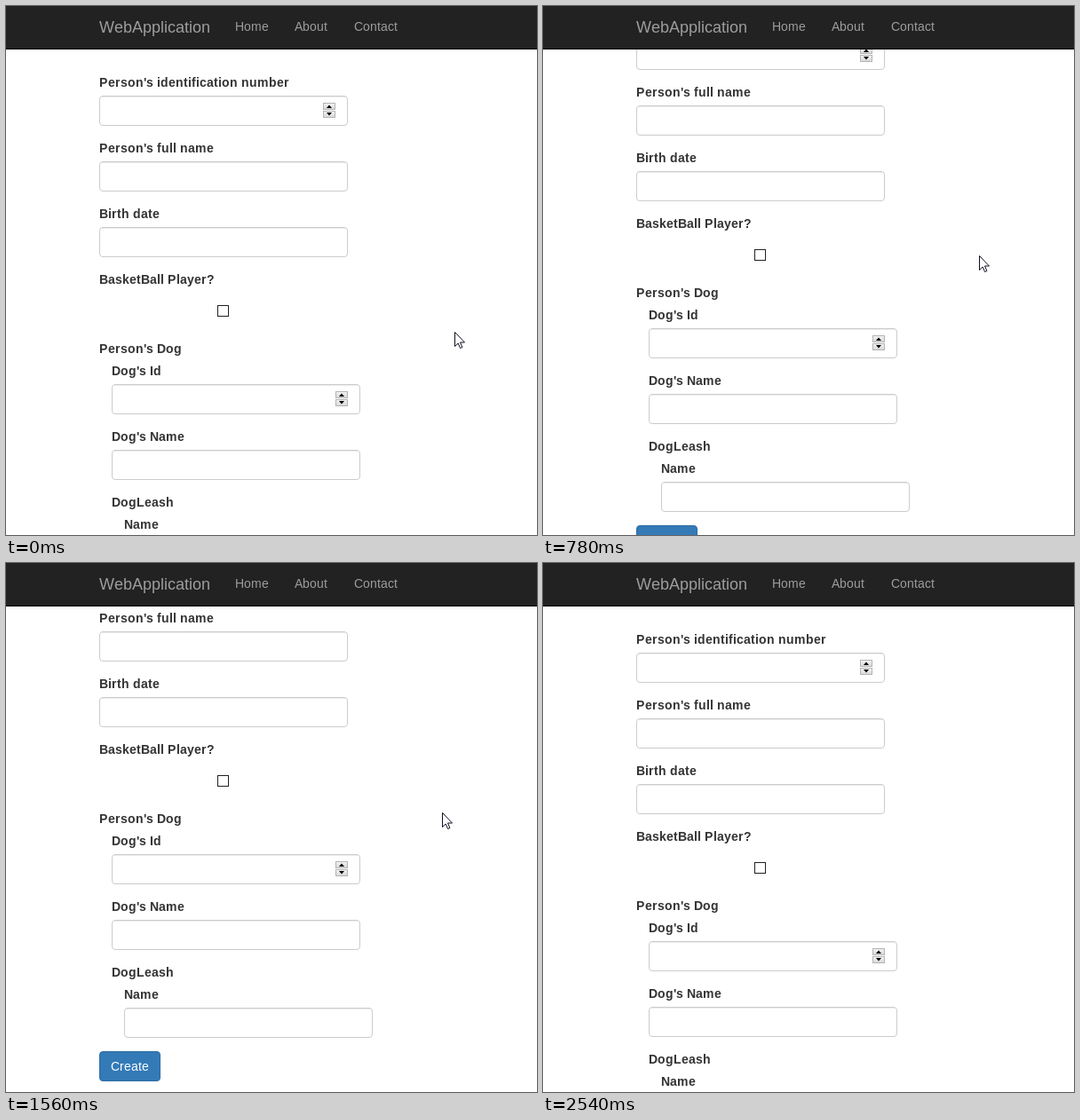
These frames come from a looping animation (598x596 px, 3.02 s). An HTML page:

```html
<!DOCTYPE html>
<html lang="en">
<head>
<meta charset="utf-8">
<title>Create person form</title>
<style>
html, body { margin: 0; width: 100%; height: 100%; overflow: hidden; background: #fff; }
svg { display: block; width: 598px; height: 596px; }
text { font-family: "Liberation Sans", Arial, sans-serif; font-size: 14px; fill: #333; white-space: pre; }
</style>
</head>
<body>
<svg id="stage" viewBox="0 0 598 596">
  <defs>
    <linearGradient id="face" x2="0" y2="1">
      <stop offset="0" stop-color="#f4f4f4"/>
      <stop offset="1" stop-color="#d8d8d8"/>
    </linearGradient>
  </defs>
  <rect width="598" height="596" fill="#fff"/>
  <g id="page"></g>
  <g id="nav">
    <rect width="598" height="48" fill="#222"/>
    <rect y="48" width="598" height="1" fill="#080808"/>
  </g>
  <path id="cursor" d="M.5 .5V16.5L4.2 13L6.6 18.5L8.9 17.5L6.5 12H11.5Z"
    fill="#fff" stroke="#101020" stroke-linejoin="round"/>
</svg>
<script>
const NS = "http://www.w3.org/2000/svg";
const page = document.getElementById("page");
const nav = document.getElementById("nav");
const cursor = document.getElementById("cursor");
const pen = document.createElement("canvas").getContext("2d");

function add(parent, tag, attrs) {
  const el = document.createElementNS(NS, tag);
  for (const key in attrs) el.setAttribute(key, attrs[key]);
  return parent.appendChild(el);
}

// Places glyphs on whole pixels, like hinted screen text.
function write(parent, str, x, y, { size = 14, bold = false, fill = "#333" } = {}) {
  const weight = bold ? "bold" : "normal";
  pen.font = `${weight} 1000px "Liberation Sans", Arial, sans-serif`;
  const bias = bold ? 0.165 : 0;
  const xs = [];
  for (const ch of str) {
    xs.push(x);
    x += Math.round(pen.measureText(ch).width * size / 1000 + bias);
  }
  add(parent, "text", {
    x: xs.join(" "), y, style: `font-size:${size}px;font-weight:${weight};fill:${fill}`
  }).textContent = str;
}

const label = (str, x, y) => write(page, str, x, y, { bold: true });

function spinner(x, y) {
  for (const dy of [0, 9])
    add(page, "rect", { x: x + .5, y: y + dy + .5, width: 13, height: 7, fill: "url(#face)", stroke: "#b4b4b4" });
  add(page, "path", { d: `M${x + 4} ${y + 6}h6l-3 -3.5zM${x + 4} ${y + 11}h6l-3 3.5z`, fill: "#000" });
}

function field(str, x, y, numeric) {
  label(str, x, y);
  const top = y + 10;
  add(page, "rect", { x: x + .5, y: top + .5, width: 279, height: 33, rx: 3.5, fill: "#fff", stroke: "#ccc" });
  add(page, "path", { d: `M${x + 3} ${top + 1.5}h274`, stroke: "#000", "stroke-opacity": .075 });
  if (numeric) spinner(x + 252, top + 8);
}

field("Person's identification number", 105, 91, true);
field("Person's full name", 105, 165);
field("Birth date", 105, 239);
label("BasketBall Player?", 105, 313);
add(page, "rect", { x: 238.5, y: 337.5, width: 12, height: 12, fill: "#fff", stroke: "#222" });
label("Person's Dog", 105, 391);
field("Dog's Id", 119, 416, true);
field("Dog's Name", 119, 490);
label("DogLeash", 119, 564);
field("Name", 133, 589);
add(page, "rect", { x: 105.5, y: 648.5, width: 68, height: 33, rx: 3.5, fill: "#337ab7", stroke: "#2e6da4" });
write(page, "Create", 118, 670, { fill: "#fff" });
add(page, "rect", { x: 105, y: 717, width: 493, height: 1, fill: "#eee" });
write(page, "© 2016 - WebApplication", 105, 753);

const grey = "#9d9d9d";
write(nav, "WebApplication", 105, 30, { size: 18, fill: grey });
write(nav, "Home", 258, 28, { fill: grey });
write(nav, "About", 325, 28, { fill: grey });
write(nav, "Contact", 392, 28, { fill: grey });

const LOOP = 3020;
const HIDE = 2540;
const ticks = [0, 70, 130, 200, 260, 320, 470, 530, 600, 620, 720, 830, 930,
  1010, 1090, 1160, 1240, 1470, 1560, 1620, 1700, 1790,
  1940, 2010, 2090, 2170, 2240, 2320, 2400, 2480, HIDE];
const scrollKeys = [[0, 0], [440, 0], [600, 27], [930, 127], [950, 127], [1240, 156],
  [1430, 156], [1560, 98], [1790, 0]];
const cursorKeys = [[0, 505, 367], [20, 505, 367], [320, 492, 281], [470, 492, 281],
  [530, 491, 281], [1700, 491, 281], [1790, 491, 286], [1870, 491, 286],
  [1940, 490, 308], [2400, 521, 539], [2480, 538, 580]];

function sample(keys, t) {
  const next = keys.findIndex(k => k[0] > t);
  if (next < 0) return keys[keys.length - 1].slice(1);
  const a = keys[next - 1], b = keys[next];
  const p = (t - a[0]) / (b[0] - a[0]);
  return a.slice(1).map((v, i) => Math.round(v + (b[i + 1] - v) * p));
}

function draw(time) {
  const t = time % LOOP;
  const tick = ticks.filter(k => k <= t).pop();
  const [scroll] = sample(scrollKeys, tick);
  const [x, y] = sample(cursorKeys, tick);
  page.setAttribute("transform", `translate(0 ${-scroll})`);
  cursor.setAttribute("transform", `translate(${x} ${y})`);
  cursor.setAttribute("visibility", tick < HIDE ? "visible" : "hidden");
}

const start = performance.now();
function loop() {
  draw(performance.now() - start);
  requestAnimationFrame(loop);
}
loop();
</script>
</body>
</html>
```
